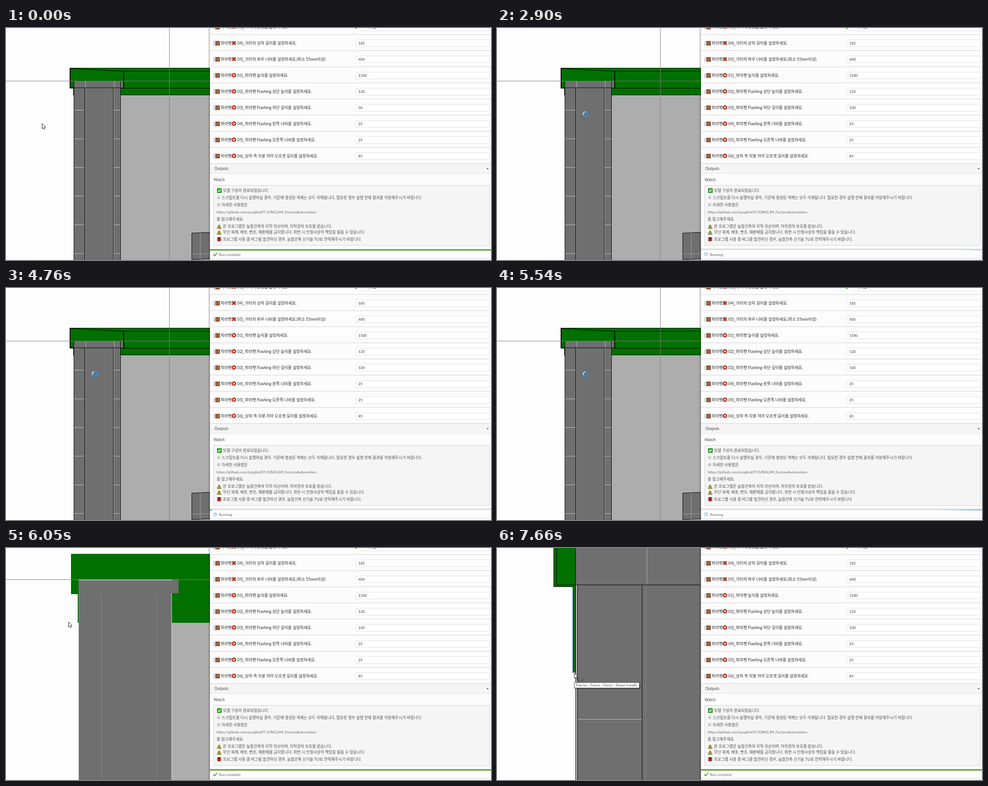
Recreate the animation shown at these times as an HTML page with a canvas. Size 1082 px wide and 518 px high, loop 7990 ms.

```html
<!DOCTYPE html>
<html lang="ko">
<head>
<meta charset="utf-8">
<style>
html, body { margin: 0; width: 100%; height: 100%; overflow: hidden; background: #fdfdfd; }
canvas { display: block; }
</style>
</head>
<body>
<canvas id="stage" width="1082" height="518"></canvas>
<script>
const ctx = document.getElementById('stage').getContext('2d');
const LOOP = 7990, PANEL = 455;
const RUN_START = 2030, RUN_END = 5720, ZOOM_START = 5960, SETTLED = 6680, HOVER = 7480;
const FONT = 'Lato, "Noto Sans CJK KR", "Noto Sans CJK", sans-serif';
const GREEN = '#007000', GRAY = '#6f6f6f', LIGHT = '#adadad';

const rows = [
  ['x', '03]_거터의 방향을 설정하세요.', ''],
  ['x', '04]_거터의 상하 길이를 설정하세요.', '185'],
  ['x', '05]_거터의 좌우 너비를 설정하세요.(최소 55mm이상)', '400'],
  ['o', '01]_파라펫 높이를 설정하세요.', '1500'],
  ['o', '02]_파라펫 Flashing 상단 높이를 설정하세요.', '120'],
  ['o', '03]_파라펫 Flashing 하단 깊이를 설정하세요.', '50'],
  ['o', '04]_파라펫 Flashing 왼쪽 너비를 설정하세요.', '25'],
  ['o', '05]_파라펫 Flashing 오른쪽 너비를 설정하세요.', '25'],
  ['o', '06]_상하 측 지붕 저마 오프셋 길이를 설정하세요.', '85']
];
const EDITED = 5;

const messages = [
  [363, 'ok', '모델 구성이 완료되었습니다.'],
  [379, '', '※ 스크립트를 다시 실행하실 경우, 기존에 생성된 객체는 모두 삭제됩니다. 필요한 경우 실행 전에 결과를 저장해주시기 바랍니다.'],
  [395, '', '※ 자세한 사용법은'],
  [411, '', 'https://github.com/junglimDT/JUNGLIM_FactoryAutomation'],
  [427, '', '를 참고해주세요.'],
  [443, 'warn', '본 프로그램은 늘참건축의 지적 자산이며, 저작권의 보호를 받습니다.'],
  [456, 'warn', '무단 복제, 배포, 변조, 재판매를 금지합니다. 위반 시 민형사상의 책임을 물을 수 있습니다.'],
  [472, 'bug', '프로그램 사용 중 버그를 발견하신 경우, 늘참건축 신기술 TU로 연락해주시기 바랍니다.']
];

const clamp = v => Math.max(0, Math.min(1, v));
const ease = v => { v = clamp(v); return v * v * (3 - 2 * v); };
const mix = (a, b, k) => a + (b - a) * k;

function rect(x, y, w, h, color) {
  ctx.fillStyle = color;
  ctx.fillRect(x, y, w, h);
}
function frame(x, y, w, h, fill, border) {
  rect(x, y, w, h, border);
  rect(x + 1, y + 1, w - 2, h - 2, fill);
}
function path(points, color, width = 1) {
  ctx.beginPath();
  points.forEach(([x, y]) => ctx.lineTo(x, y));
  ctx.strokeStyle = color;
  ctx.lineWidth = width;
  ctx.stroke();
}
function shape(points, fill, border) {
  ctx.beginPath();
  points.forEach(([x, y]) => ctx.lineTo(x, y));
  ctx.closePath();
  ctx.fillStyle = fill;
  ctx.fill();
  if (border) {
    ctx.strokeStyle = border;
    ctx.lineWidth = 1;
    ctx.stroke();
  }
}
function ring(x, y, r, color, width) {
  ctx.beginPath();
  ctx.arc(x, y, r, 0, Math.PI * 2);
  ctx.strokeStyle = color;
  ctx.lineWidth = width;
  ctx.stroke();
}
function text(str, x, centre, color, size = 8.7) {
  ctx.font = `${size}px ${FONT}`;
  ctx.fillStyle = color;
  ctx.fillText(str, x, centre + 3);
}

// View: screen = world * s + offset
function viewAt(t) {
  const view = { s: 1, x: 0, y: 0 };
  const zoom = (cx, cy, k) => {
    view.s *= k;
    view.x = cx + (view.x - cx) * k;
    view.y = cy + (view.y - cy) * k;
  };
  if (t >= ZOOM_START) zoom(140, 166, t < 6020 ? Math.SQRT2 : 2);
  const notches = Math.max(0, Math.min(5, Math.floor((t - 6340) / 70) + 1));
  zoom(155.5, 111.75, 3 ** (notches / 5));
  return view;
}

function drawModel(t) {
  const view = viewAt(t);
  const X = x => x * view.s + view.x, Y = y => y * view.s + view.y;
  // The small bias keeps values on whole pixels stable after repeated zooming.
  const cell = v => Math.floor(v + 0.01);
  const snap = v => cell(v) + 0.5;
  const fill = (x1, y1, x2, y2, color) => {
    const l = cell(X(x1)), u = cell(Y(y1));
    rect(l, u, cell(X(x2)) - l, cell(Y(y2)) - u, color);
  };
  const line = (x1, y1, x2, y2, color = '#000', width = 1) =>
    path([[snap(X(x1)), snap(Y(y1))], [snap(X(x2)), snap(Y(y2))]], color, width);
  const detailed = t < ZOOM_START || t >= SETTLED;
  const drop = t < RUN_END ? 150 : 166.6;
  const roofLeft = 142.93, innerLeft = 143.93, fascia = 150.03, wall = 151.03;
  const roofBase = 134.7, capBase = 133.93;

  rect(0, 0, PANEL, 518, '#fdfdfd');
  fill(255, capBase, 600, 600, LIGHT);
  fill(roofLeft, 89.93, 600, roofBase, GREEN);
  fill(255, capBase, 600, drop, GREEN);
  fill(fascia, capBase, wall, drop, GREEN);
  fill(wall, capBase, 255, 600, GRAY);
  fill(wall, 118.6, 262.6, capBase, GRAY);

  if (detailed) {
    fill(wall, capBase, 151.7, 600, '#b4b4b4');
    shape([[X(414.5), Y(458)], [X(470), Y(455.5)], [X(470), Y(514.5)], [X(414.5), Y(517)]], GRAY, '#000');
    line(433, 457, 433, 516, '#a0a0a0');
    line(414, 504, 470, 503, '#a0a0a0');
    for (let y = 183.98; y < 520; y += 64) {
      line(151.8, y, 175.7, y, '#c4c4c4');
      line(240, y, 255, y, '#c4c4c4');
    }
    line(177.6, 119, 177.6, 133.5, '#b8b8b8');
    line(241.2, 119, 241.2, 133.5, '#b8b8b8');
    line(177.05, capBase, 177.05, 600, '#858585');
    line(240.5, capBase, 240.5, 600, '#b8b8b8');

    line(roofLeft, 89.93, 600, 89.93);
    line(innerLeft, 90.5, 263, 96);
    line(263, 96, 600, 96);
    line(roofLeft, 89.93, roofLeft, roofBase);
    line(innerLeft, 89.93, innerLeft, capBase);
    line(roofLeft, roofBase, fascia, roofBase);
    line(innerLeft, capBase, 255, capBase);
    line(255, roofBase, 600, roofBase);
    line(262.6, 96, 262.6, 134, '#000', 2);
    line(wall, 118.6, 255.5, 118.6);
    line(wall, 118.6, wall, 600);
    line(fascia, roofBase, fascia, drop);
    line(fascia, drop - 0.1, wall, drop - 0.1);
    line(151.7, capBase, 151.7, 600);
    line(255, 118.6, 255, 600);
    line(255, drop - 0.1, 600, drop - 0.1);
    line(175.75, capBase, 175.75, 600);
    line(239.3, capBase, 239.3, 600);
  } else {
    line(wall, 118.6, 255, 118.6, '#f2f2f2');
    line(wall, capBase, wall, 600, '#8c8c8c');
    line(176.2, capBase, 176.2, 600, '#858585');
    line(237.7, capBase, 237.7, 600, '#858585');
    line(254.8, capBase, 254.8, 600, '#d8d8d8');
  }
  line(-400, 118.2, 900, 118.2, '#7d7d7d');
  line(364.2, -400, 364.2, 900, '#7d7d7d');

  if (t >= HOVER) path([[169.5, 87], [169.5, 278]], '#003a78', 1.5);
}

function drawMark(kind, y) {
  if (kind === 'x') {
    for (const [color, width] of [['#5a1a12', 3.4], ['#cf4028', 2.2]]) {
      path([[505, y - 3.5], [512, y + 3.5]], color, width);
      path([[512, y - 3.5], [505, y + 3.5]], color, width);
    }
  } else {
    ring(508.5, y, 3.6, '#6a2015', 3);
    ring(508.5, y, 3.6, '#d5472c', 2);
  }
}

function drawIcon(kind, y) {
  if (kind === 'ok') {
    frame(471, y - 5, 10, 10, '#16c60c', '#0b5c0a');
    path([[473, y], [475, y + 2.3], [479, y - 2.5]], '#fff', 1.5);
  } else if (kind === 'warn') {
    shape([[475.5, y - 4], [480, y + 4.5], [471, y + 4.5]], '#f7d51d', '#4a4100');
    rect(475, y - 1, 1, 3, '#000');
    rect(475, y + 3, 1, 1, '#000');
  } else if (kind === 'bug') {
    for (const dy of [-3, 0, 3]) path([[470.5, y + dy], [480.5, y + dy]], '#2a1010');
    ctx.beginPath();
    ctx.ellipse(475.5, y, 3.7, 4.6, 0, 0, Math.PI * 2);
    ctx.fillStyle = '#b3201c';
    ctx.fill();
    path([[472.5, y - 4], [478.5, y - 4]], '#2a1010', 1.6);
  }
}

function drawField(t, y, value) {
  const focused = t >= 640 && t < RUN_START;
  frame(780, y - 8, 299, 16, '#fff', '#e2e2e2');
  if (focused) rect(780, y + 8, 299, 2, '#62bde6');
  const selected = focused && t < 1200;
  if (selected) rect(786, y - 6, 10, 12, '#2f7fd6');
  text(value, 786, y + 0.3, selected ? '#fff' : '#333', 8.1);
  if (focused && !selected) {
    rect(Math.round(786 + ctx.measureText(value).width), y - 6, 1, 12, '#000');
  }
}

function drawRows(t) {
  const typed = t < 1200 ? '50' : t < 1245 ? '1' : t < 1290 ? '10' : '100';
  rows.forEach(([mark, label, value], i) => {
    const y = 36 * i - 2;
    text('[', 463, y - 0.5, '#444', 8.9);
    frame(467, y - 5, 10, 10, '#a0623f', '#6e3f26');
    text('파라펫', 479, y - 0.5, '#2a2a2a', 8.9);
    drawMark(mark, y - 0.5);
    text(label, 516, y - 0.5, '#2a2a2a', 8.9);
    rect(PANEL, y + 16, 627, 1, '#d2d2d2');
    if (i === 0) {
      frame(793, -10, 286, 17, '#fff', '#e2e2e2');
      path([[778.5, -1], [780.5, 1.5], [784, -3]], '#3f9a2a', 1.5);
      text('사각형', 802, y - 0.5, '#222');
    } else {
      drawField(i === EDITED ? t : 0, y, i === EDITED ? typed : value);
    }
  });
}

function drawProgress(t) {
  const period = 900, length = 200;
  const phase = Math.max(0, t - 2057) % period / period;
  const head = PANEL + phase * (1082 - PANEL + length);
  const glow = ctx.createLinearGradient(head - length, 0, head, 0);
  glow.addColorStop(0, 'rgba(52,155,208,0)');
  glow.addColorStop(0.9, 'rgba(52,155,208,1)');
  const left = Math.max(PANEL, head - length);
  rect(left, 495, Math.min(1082, head) - left, 2, glow);
}

function drawStatus(t) {
  if (t >= RUN_START && t < RUN_END) {
    rect(PANEL, 493, 627, 2, '#cfcfcf');
    drawProgress(t);
    ring(466.5, 505.5, 3.7, '#56a9d6', 1);
    path([[466.5, 503], [466.5, 505.5], [468.5, 505.5]], '#56a9d6');
    text('Running', 475, 505.5, '#666', 8.3);
  } else {
    rect(PANEL, 494, 627, 3, '#5f9c33');
    path([[462.5, 505.5], [465.5, 508.5], [471, 502]], '#4c9a2a', 1.9);
    text('Run complete', 475, 505.5, '#666', 8.1);
  }
  rect(PANEL, 514, 627, 1, '#d8d8d8');
}

function drawPanel(t) {
  const shade = ctx.createLinearGradient(450, 0, PANEL, 0);
  shade.addColorStop(0, 'rgba(0,0,0,0)');
  shade.addColorStop(1, 'rgba(0,0,0,.25)');
  rect(450, 0, 5, 518, shade);
  rect(PANEL, 0, 627, 518, '#fcfcfc');
  drawRows(t);

  rect(PANEL, 303, 627, 21, '#f5f5f5');
  rect(PANEL, 324, 627, 1, '#e3e3e3');
  text('Outputs', 465, 313.5, '#444', 8.6);
  shape([[1072, 315], [1074.5, 312], [1077, 315]], '#555');
  text('Watch', 463, 339, '#444', 8.7);
  frame(463, 351, 616, 135, '#f5f5f5', '#d2d2d2');
  for (const [y, icon, str] of messages) {
    const link = str.startsWith('http');
    drawIcon(icon, y);
    text(str, icon ? 484 : 470, y, link ? '#6a6a6a' : '#4c4c4c', link ? 8.4 : 8.7);
  }
  drawStatus(t);
}

function drawArrow(x, y) {
  const outline = [[0, 0], [0, 11.5], [2.7, 9], [4.5, 13], [6.5, 12], [4.7, 8.3], [8, 8]];
  shape(outline.map(([dx, dy]) => [x + 0.5 + dx, y + 0.5 + dy]), '#fff', '#222');
}
function drawBeam(x, y) {
  path([[x - 2, y - 6], [x + 3, y - 6]], '#222');
  path([[x + 0.5, y - 6], [x + 0.5, y + 6]], '#222');
  path([[x - 2, y + 6], [x + 3, y + 6]], '#222');
}
function drawSpinner() {
  ring(197.5, 192, 5, '#2196e8', 2.4);
  ctx.beginPath();
  ctx.arc(197.5, 192, 5, Math.PI * 0.85, Math.PI * 1.45);
  ctx.strokeStyle = '#a9dcff';
  ctx.stroke();
}

function drawTooltip() {
  path([[182.5, 290], [182.5, 299]], '#4a4a4a');
  path([[192.5, 290], [192.5, 299]], '#4a4a4a');
  path([[183, 295.5], [192, 295.5]], '#4a4a4a');
  rect(174, 302, 146, 13, 'rgba(0,0,0,.3)');
  frame(172, 300, 146, 13, '#fff', '#555');
  text('Fascias : Fascia : Fascia : Shape handle', 176, 306.2, '#555', 8.3);
}

function drawPointer(t) {
  if (t < 1860) {
    const go = ease((t - 30) / 610), leave = ease((t - 1560) / 300);
    const x = mix(mix(80, 814, go), 740, leave), y = mix(mix(213, 178, go), 525, leave);
    const overField = x > 780 && y > 170 && y < 187;
    (overField ? drawBeam : drawArrow)(x, y);
  } else if (t < RUN_END) {
    if (t >= 2300) drawSpinner();
  } else {
    const back = ease((t - RUN_END) / 240), aim = ease((t - 6060) / 280), hover = ease((t - 7140) / 500);
    const x = mix(mix(mix(197, 139, back), 155, aim), 172, hover) - 26 * Math.sin(Math.PI * hover);
    const y = mix(mix(mix(192, 164.5, back), 111, aim), 279, hover);
    drawArrow(x, y);
  }
}

function draw(t) {
  drawModel(t);
  drawPanel(t);
  if (t >= 7640) drawTooltip();
  drawPointer(t);
}

const start = performance.now();
function tick() {
  draw((performance.now() - start) % LOOP);
  requestAnimationFrame(tick);
}
tick();
</script>
</body>
</html>
```
